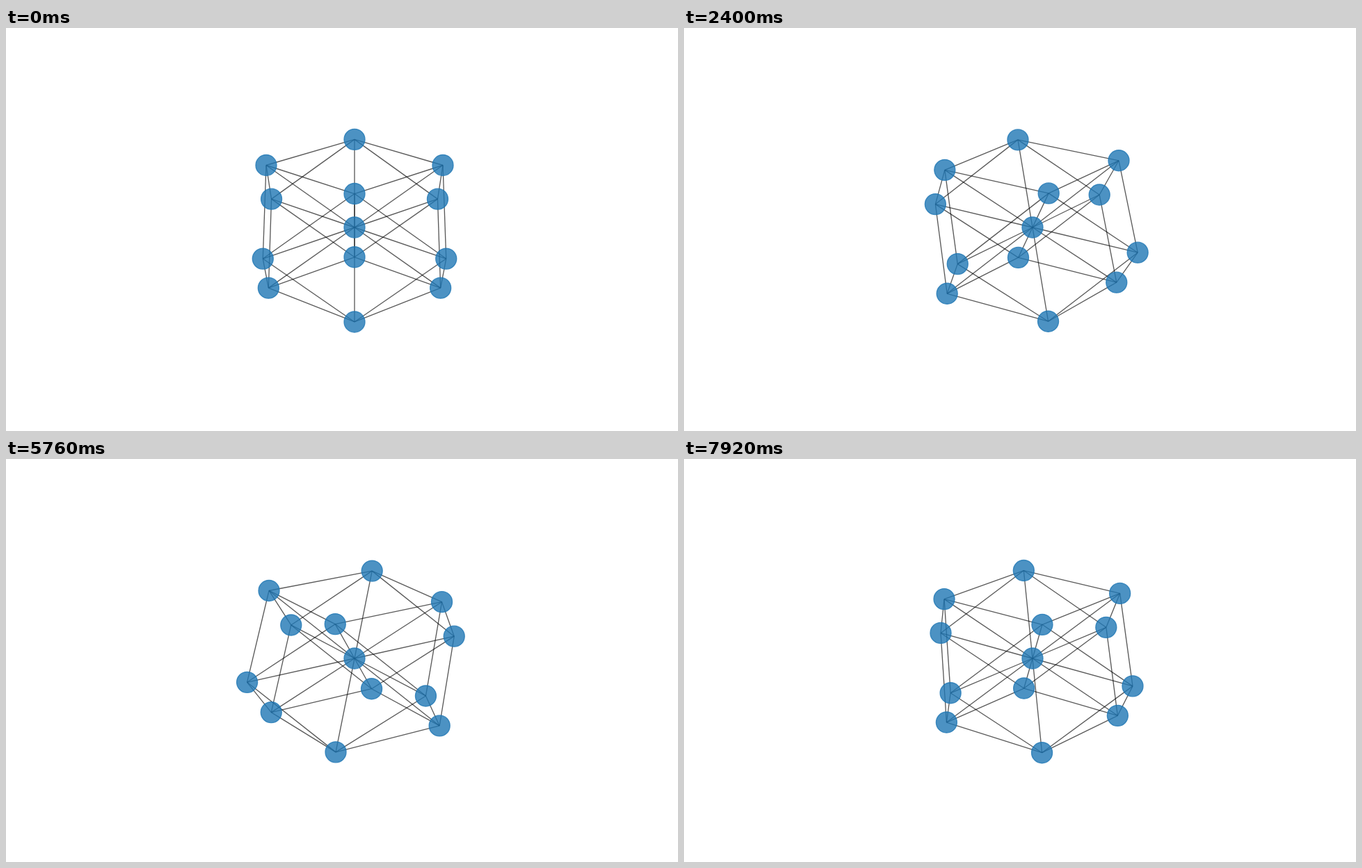
These frames come from a looping animation (966 px wide and 580 px high, 8000 ms). An HTML page with a canvas:

```html
<!DOCTYPE html>
<html lang="en">
<head>
<meta charset="utf-8">
<title>Rotating cuboctahedron</title>
<style>
  html, body { margin: 0; width: 100%; height: 100%; overflow: hidden; background: #fff; }
  canvas { display: block; }
</style>
</head>
<body>
<canvas id="stage" width="966" height="580"></canvas>
<script>
const ctx = document.getElementById('stage').getContext('2d');
const LOOP = 8000, STEP = 120, DEGREES_PER_STEP = 4;
const CENTER = { x: 501, y: 287 };
const UNIT = 125.3;         // pixels per lattice unit at the centre
const PERSPECTIVE = 0.052;  // lattice unit relative to the viewing distance
const HEIGHT = 0.75;        // vertical squash of the plot box
const rad = degrees => degrees * Math.PI / 180;
const SIN_EL = Math.sin(rad(20)), COS_EL = Math.cos(rad(20));

// The centre and its twelve nearest neighbours in a face-centred cubic lattice.
const nodes = [];
for (let x = -1; x <= 1; x++)
  for (let y = -1; y <= 1; y++)
    for (let z = -1; z <= 1; z++)
      if ((x + y + z) % 2 === 0) nodes.push([x, y, z]);

const edges = [];
nodes.forEach((p, i) => nodes.slice(0, i).forEach((q, j) => {
  const distance2 = p.reduce((sum, v, k) => sum + (v - q[k]) ** 2, 0);
  if (distance2 === 2) edges.push([i, j]);
}));

function project([x, y, z], angle) {
  const sin = Math.sin(angle), cos = Math.cos(angle);
  const right = x * cos + y * sin;
  const away = y * cos - x * sin;
  const up = z * HEIGHT;
  const depth = away * COS_EL - up * SIN_EL;
  const scale = UNIT / (1 + PERSPECTIVE * depth);
  return {
    x: CENTER.x + right * scale,
    y: CENTER.y - (away * SIN_EL + up * COS_EL) * scale,
    depth
  };
}

function draw(time) {
  const step = Math.floor((time % LOOP) / STEP);
  const points = nodes.map(p => project(p, rad(step * DEGREES_PER_STEP)));

  ctx.fillStyle = '#fff';
  ctx.fillRect(0, 0, 966, 580);
  ctx.lineWidth = 1.34;

  ctx.strokeStyle = 'rgba(0, 0, 0, 0.65)';
  for (const [i, j] of edges) {
    ctx.beginPath();
    ctx.moveTo(points[i].x, points[i].y);
    ctx.lineTo(points[j].x, points[j].y);
    ctx.stroke();
  }

  ctx.fillStyle = ctx.strokeStyle = 'rgba(31, 119, 180, 0.8)';
  for (const p of points.sort((a, b) => b.depth - a.depth)) {
    ctx.beginPath();
    ctx.arc(p.x, p.y, 15, 0, 2 * Math.PI);
    ctx.fill();
    ctx.stroke();
  }
}

const start = performance.now();
function tick() {
  draw(performance.now() - start);
  requestAnimationFrame(tick);
}
tick();
</script>
</body>
</html>
```
